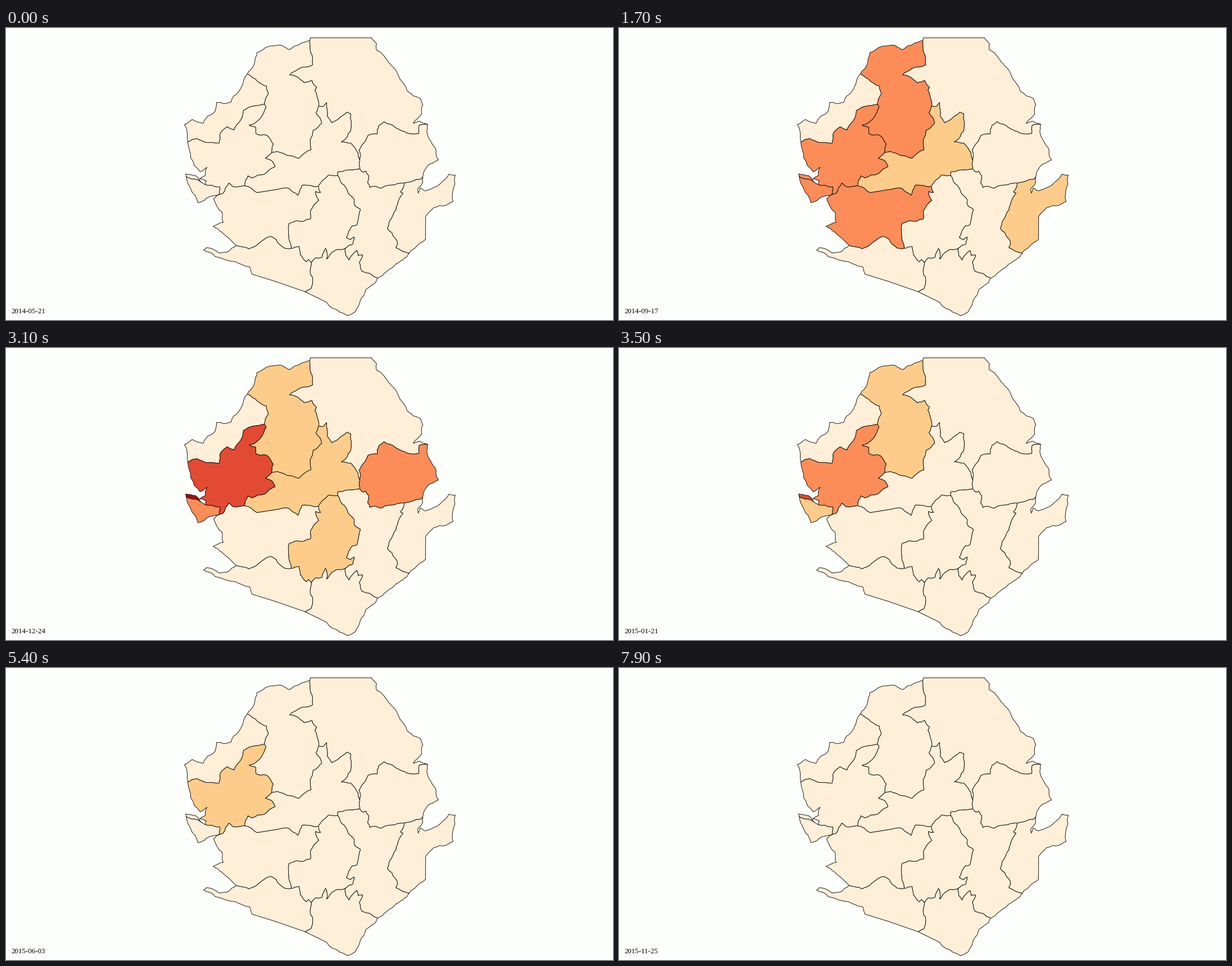
Write a matplotlib script that moves like this. It is 1080 px wide and 519 px high and loops after 8000 ms.

```python
import numpy as np
import matplotlib.pyplot as plt
from matplotlib.animation import FuncAnimation
from matplotlib.patches import Polygon

W, H, DPI = 1080, 519, 100
FRAMES, INTERVAL = 80, 100
SHADES = ["#ffeed8", "#fdcc8a", "#fc8d59", "#e34a33", "#b30000"]
START = np.datetime64("2014-05-21")
STRAIGHT = 38    # spans longer than this stay straight
ROUGH = 0.1      # sideways shift of a midpoint, relative to its span

rng = np.random.default_rng(4)

# Points where borders meet
NODES = dict(
    A=(540, 21), B=(750, 171), C=(629, 234), D=(556, 138), E=(629, 250),
    F=(708, 275), G=(741, 264), H=(717, 400), I=(661, 444), J=(603, 391),
    K=(590, 262), L=(555, 281), M=(543, 417), N=(507, 391), O=(531, 468),
    P=(409, 386), Q=(424, 280), R=(378, 296), S=(472, 221), T=(459, 135),
    U=(429, 81), V=(323, 202), W=(354, 278), X=(346, 273), Y=(320, 263),
    Z=(326, 260))
borders = {}


def roughen(pts):
    """Insert a randomly displaced midpoint into every short span."""
    out = [pts[0]]
    for a, b in zip(pts[:-1], pts[1:]):
        dx, dy = b - a
        if 4 < np.hypot(dx, dy) < STRAIGHT:
            out.append((a + b) / 2 + rng.uniform(-ROUGH, ROUGH) * np.array([-dy, dx]))
        out.append(b)
    return np.array(out)


def border(ends, *via):
    """Ragged line between two nodes by way of a few key points."""
    a, b = ends
    pts = np.array([*NODES[a], *via, *NODES[b]], float).reshape(-1, 2)
    line = roughen(roughen(pts))
    borders[a + b], borders[b + a] = line, line[::-1]


# North and east
border("AB", 541, 17, 650, 17, 659, 28, 659, 39, 673, 50, 682, 62, 695, 78,
       708, 100, 714, 112, 737, 125, 741, 136, 739, 152, 724, 169, 735, 165)
border("BC", 735, 172, 734, 187, 712, 186, 697, 179, 686, 172, 672, 166,
       663, 173, 660, 188, 643, 191, 637, 203, 628, 217)
border("CD", 626, 222, 613, 204, 596, 202, 606, 194, 613, 181, 613, 152,
       606, 149, 591, 161, 579, 168, 571, 156, 570, 132, 564, 139)
border("DA", 553, 122, 549, 110, 552, 105, 544, 93, 530, 97, 520, 88,
       504, 83, 520, 72, 545, 65, 542, 44)
border("BG", 749, 178, 754, 199, 763, 212, 769, 234, 752, 242, 742, 258)
border("GF", 738, 268, 722, 272)
border("FE", 692, 278, 668, 284, 652, 281, 647, 283, 643, 275, 645, 262,
       640, 254, 635, 256)
border("EC")
border("GH", 741, 273, 732, 286, 733, 293, 736, 284, 746, 289, 761, 283,
       779, 270, 788, 259, 799, 261, 794, 292, 795, 308, 782, 315, 760, 319,
       746, 335, 746, 375, 728, 390)
border("HF", 693, 390, 696, 380, 686, 363, 678, 356, 688, 332, 696, 313,
       706, 293, 701, 291)

# South
border("HI", 713, 406, 699, 416, 676, 433)
border("IJ", 633, 432, 628, 416, 634, 403, 626, 404, 624, 395, 610, 412,
       604, 404)
border("JK", 617, 383, 619, 371, 612, 376, 605, 372, 616, 351, 624, 349,
       630, 322, 620, 315, 619, 304, 608, 292, 597, 276)
border("KE", 590, 255, 605, 252)
border("IO", 656, 453, 640, 464, 630, 483, 621, 504, 607, 511, 594, 505,
       570, 487)
border("OM", 537, 465, 542, 463, 545, 443, 541, 436)
border("MJ", 550, 408, 562, 407, 568, 391, 570, 410, 577, 401, 590, 393)
border("MN", 538, 411, 534, 415, 523, 402, 521, 388)
border("OP", 479, 450, 437, 437, 433, 424, 408, 415, 372, 406, 351, 394,
       356, 390, 378, 399, 395, 397)
border("PN", 432, 392, 448, 383, 470, 370, 480, 375, 495, 391)
border("KL", 573, 261, 562, 271)
border("LN", 559, 292, 550, 290, 556, 306, 541, 325, 541, 339, 517, 342,
       503, 347, 503, 376)
border("LQ", 540, 279, 526, 279, 519, 297, 504, 285, 484, 286, 446, 292)

# Centre and west
border("PR", 383, 362, 368, 352, 386, 345, 384, 327, 369, 303)
border("RQ", 386, 293, 396, 275, 406, 282)
border("QS", 430, 262, 437, 266, 460, 259, 478, 246, 474, 237, 461, 231)
border("SD", 483, 219, 500, 226, 521, 231, 542, 216, 546, 181, 561, 169,
       551, 150)
border("ST", 475, 206, 463, 190, 444, 187, 444, 176, 432, 172, 449, 163,
       458, 150, 462, 140)
border("TU", 466, 117, 463, 103, 443, 90)
border("UA", 441, 64, 446, 43, 462, 34, 490, 30, 504, 38, 520, 30)
border("VT", 339, 196, 355, 203, 379, 204, 380, 189, 393, 175, 405, 181,
       419, 160, 422, 146, 441, 138)
border("UV", 418, 105, 404, 121, 400, 131, 374, 132, 372, 147, 350, 169,
       331, 162, 317, 171)
border("VW", 328, 230, 345, 255, 357, 247, 354, 262, 344, 268, 356, 271)
border("RW", 380, 282, 366, 279)
border("WX")
border("XY", 336, 268, 328, 267)
border("YR", 328, 285, 341, 310, 355, 303)
border("XZ", 337, 262)
border("ZY", 319, 259)

# Each district: the nodes around it, then its waves (middle week, spread, peak)
DISTRICTS = [
    ("ABCD", [(23, 4, 1)]),
    ("BGFEC", [(31, 3.2, 2)]),
    ("FGH", [(10, 7.8, 2)]),
    ("EFHIJK", [(10, 4.2, 2), (23, 4, 1)]),
    ("JIOM", [(19, 2, 1)]),
    ("NMOP", []),
    ("LKJMN", [(27, 8, 1)]),
    ("LNPRQ", [(17, 3.5, 2)]),
    ("DCEKLQS", [(25, 11, 1)]),
    ("ADSTU", [(22, 8, 3), (39, 5, 1)]),
    ("UTV", [(23, 4, 1)]),
    ("VTSQRW", [(26, 12, 3), (54, 3, 1)]),
    ("RWXY", [(24, 13, 3)]),
    ("YXZ", [(28, 14, 4)]),
]

fig = plt.figure(figsize=(W / DPI, H / DPI), dpi=DPI, facecolor="#fdfffc")
ax = fig.add_axes([0, 0, 1, 1])
ax.set_xlim(-0.5, W - 0.5)
ax.set_ylim(H - 0.5, -0.5)
ax.axis("off")


def district(ring):
    pts = np.vstack([borders[a + b] for a, b in zip(ring, ring[1:] + ring[0])])
    return ax.add_patch(Polygon(pts, closed=True, edgecolor="black",
                                linewidth=0.62, joinstyle="round"))


shapes = [district(ring) for ring, _ in DISTRICTS]
label = ax.text(8.5, 506.5, "", family="Liberation Serif",
                size=13 * 72 / DPI, color="black", va="baseline")


def level(waves, week):
    """Height of the strongest bell-shaped wave, rounded to a shade."""
    heights = [p * np.exp(-((week - mid) / s) ** 2) for mid, s, p in waves]
    return int(max(heights, default=0) + 0.5)


def draw(week):
    for shape, (_, waves) in zip(shapes, DISTRICTS):
        shape.set_facecolor(SHADES[level(waves, week)])
    label.set_text(str(START + 7 * week))
    return [*shapes, label]


anim = FuncAnimation(fig, draw, frames=FRAMES, interval=INTERVAL,
                     init_func=lambda: draw(0), repeat=True, repeat_delay=0)
plt.show()
```
